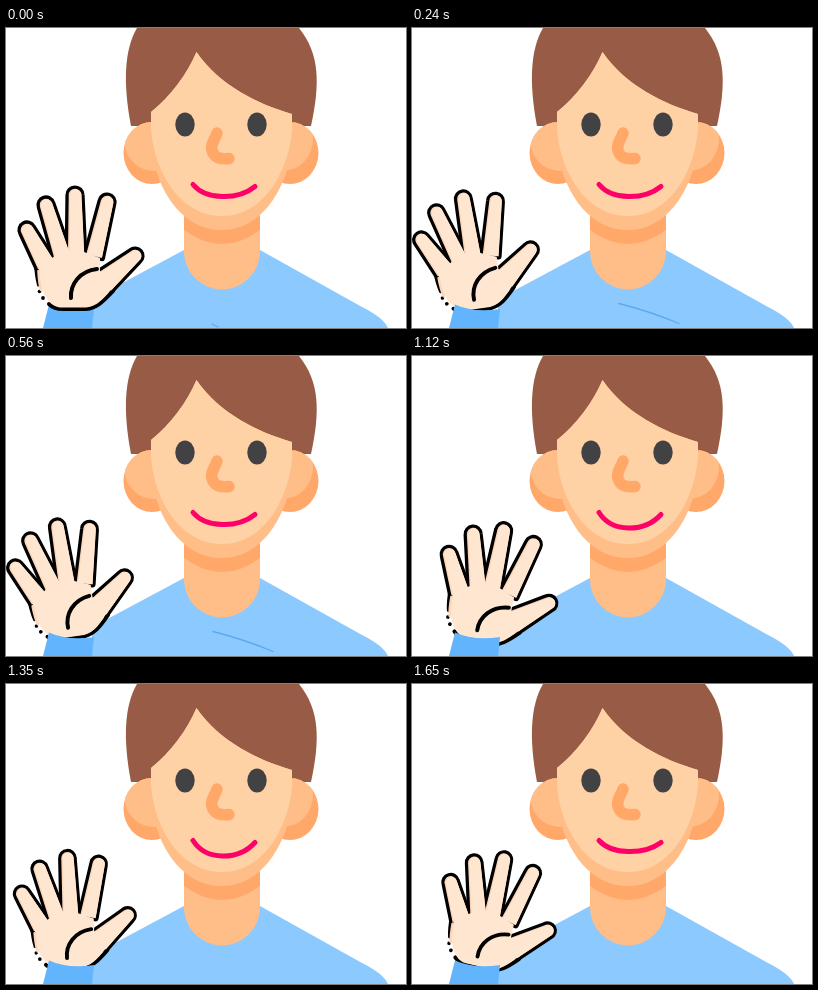
An HTML page with a canvas for the animation above (1.8 s loop, 400x300 px).

```html
<!DOCTYPE html>
<html lang="en">
<head>
<meta charset="utf-8">
<title>Waving hello</title>
<style>
html, body { margin: 0; width: 100%; height: 100%; overflow: hidden; background: #fff; }
canvas { display: block; width: 400px; height: 300px; }
</style>
</head>
<body>
<canvas id="stage" width="400" height="300"></canvas>
<script>
const ctx = document.getElementById('stage').getContext('2d');
const LOOP = 1800;
const INK = '#000';
const SKIN = '#fee6d1';
const SKIN_SHADE = '#fdd5b8';
const RIM = '#ffbe88';
const SHADOW = '#ffa869';

// Each pose is held until the next start; x, y is the fork between thumb and index finger.
const poses = [
  { start: 0, x: 97, y: 240, turn: 0, size: 1, smile: 168.5, fold: 'tip', handOnTop: true },
  { start: 240, x: 89, y: 238, turn: -8.3, size: 0.985, smile: 168.5, fold: 'full' },
  { start: 780, x: 103, y: 252, turn: 12.6, size: 1, smile: 172 },
  { start: 1350, x: 91, y: 244, turn: -2, size: 0.97, smile: 172 },
  { start: 1560, x: 91, y: 244, turn: -2, size: 0.97, smile: 167 },
  { start: 1650, x: 102.5, y: 251, turn: 13, size: 0.975, smile: 167.5 }
];

// Pinky to thumb: tip x, tip y, base x, base y, half width at the base
const TIP_RADIUS = 6.3;
const fingers = [
  [21, 202, 40, 237, 9],
  [40, 177, 56, 228, 8],
  [69, 167, 70, 225, 8],
  [101, 174, 88, 228, 8],
  [129, 228, 98, 254, 11]
];

function fill(path, color) {
  ctx.fillStyle = color;
  ctx.fill(new Path2D(path));
}

function stroke(path, color, width) {
  ctx.strokeStyle = color;
  ctx.lineWidth = width;
  ctx.stroke(new Path2D(path));
}

function ellipsePath(x, y, rx, ry) {
  const path = new Path2D();
  path.ellipse(x, y, rx, ry, 0, 0, Math.PI * 2);
  return path;
}

function fillInside(clip, path, color) {
  ctx.save();
  ctx.clip(new Path2D(clip));
  fill(path, color);
  ctx.restore();
}

function fingerPath([x1, y1, x2, y2, base], trim = 0, dx = 0) {
  const angle = Math.atan2(y1 - y2, x1 - x2);
  const side = angle + Math.PI / 2;
  const half = base - trim;
  const path = new Path2D();
  path.moveTo(x2 + dx + half * Math.cos(side), y2 + half * Math.sin(side));
  path.arc(x1 + dx, y1, TIP_RADIUS - trim, side, side - Math.PI, true);
  path.lineTo(x2 + dx - half * Math.cos(side), y2 - half * Math.sin(side));
  path.closePath();
  return path;
}

function drawBody(fold) {
  fill('M86 300V271L107 260L178 222H254L356 279Q378 290 382 300Z', '#8cc9ff');
  if (fold === 'full') stroke('M207 275.5Q240 284 267 295.5', '#5aaaf0', 1.3);
  if (fold === 'tip') stroke('M206 296L212 299', '#5aaaf0', 1.3);
  fill('M178 180V223.5A38 38 0 0 0 254 223.5V180Z', RIM);
  fill('M178 180V202Q216 230 254 202V180Z', SHADOW);
}

function drawEar(x, lightX) {
  const ear = ellipsePath(x, 125, 28.5, 31);
  fill(ear, SHADOW);
  fillInside(ear, ellipsePath(lightX, 111, 30, 32), RIM);
}

function drawHead(smile) {
  fill('M131 0C118 22 117 56 125 98H305C314 56 314 26 293 0Z', '#985b45');
  drawEar(146, 148);
  drawEar(284, 277);
  const face = 'M145 84V112C146 150 170 202 216 202C261 202 285 150 286 112V86C252 76 214 58 190.5 24C181 46 165 68 145 84Z';
  fill(face, RIM);
  fillInside(face, 'M145 20V98C146 136 170 188 216 188C261 188 285 136 286 98V20Z', '#ffd2a6');
  fill(ellipsePath(179, 96.5, 9.7, 12), '#424143');
  fill(ellipsePath(251, 96.5, 9.7, 12), '#424143');
  stroke('M211 105C209 112 203 117 207 125C210 131 216 131 223 130.5', '#ffa867', 11.5);
  const bend = (smile - 39.3) / 0.75;
  stroke(`M187 156.5C200 ${bend} 232 ${bend} 249 158.5`, '#ff0068', 5);
}

function drawHand({ x, y, turn, size }) {
  ctx.save();
  ctx.translate(x, y);
  ctx.rotate(turn * Math.PI / 180);
  ctx.scale(size, size);
  ctx.translate(-97, -240);
  for (const f of fingers) stroke(fingerPath(f), INK, 6.6);
  stroke('M29.5 234Q30 248 32.5 257', INK, 3);
  fill(ellipsePath(33.5, 263.5, 1.8, 1.8), INK);
  fill(ellipsePath(37, 270, 1.9, 1.9), INK);
  stroke('M43 276Q48 281 57 281H80C90 280 97 274 107 263', INK, 4);
  for (const f of fingers) fill(fingerPath(f), SKIN_SHADE);
  for (const f of fingers) fill(fingerPath(f, 0.6, 0.8), SKIN);
  fill('M33 240L43 232L56 223L62 222L78 224L94 230L94 243L107 260C99 268 92 279 80 279.5H54C42 278 34 262 33 246Z', SKIN);
  stroke('M32.5 243Q33 255 35 262', SKIN_SHADE, 2.5);
  stroke('M65 270C64 256 74 243 91 241', INK, 4);
  ctx.restore();
}

function drawSleeve() {
  fill('M37 300L43 276.5Q62 285 88 281L86 300Z', '#62b5fd');
}

function draw(time) {
  const t = time % LOOP;
  const pose = poses.findLast(p => t >= p.start);
  ctx.fillStyle = '#fff';
  ctx.fillRect(0, 0, 400, 300);
  ctx.lineCap = ctx.lineJoin = 'round';
  drawBody(pose.fold);
  drawHead(pose.smile);
  if (pose.handOnTop) drawSleeve();
  drawHand(pose);
  if (!pose.handOnTop) drawSleeve();
}

const begin = performance.now();
function tick() {
  draw(performance.now() - begin);
  requestAnimationFrame(tick);
}
tick();
</script>
</body>
</html>
```
